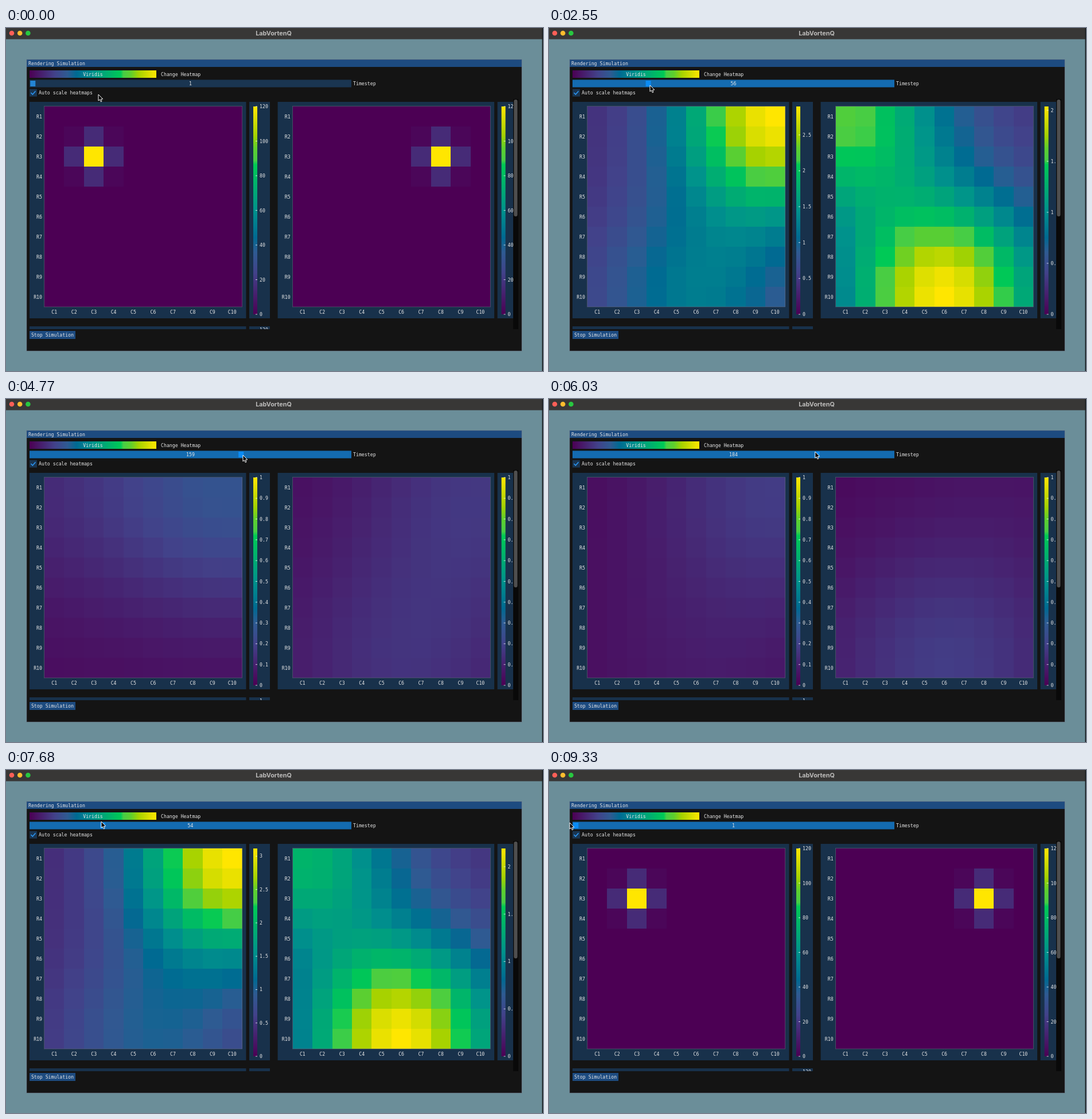
An HTML page with a canvas for the animation above (9780 ms loop, 936 px wide and 599 px high).

```html
<!DOCTYPE html>
<html lang="en">
<head>
<meta charset="utf-8">
<title>Heatmap simulation</title>
<style>
html, body { margin: 0; width: 100%; height: 100%; overflow: hidden; background: #6b8e99; }
canvas { display: block; }
</style>
</head>
<body>
<canvas id="stage" width="936" height="599"></canvas>
<script>
const ctx = document.getElementById('stage').getContext('2d');
const LOOP = 9780, TICK = 30, LAG = 20, DRAG_START = 840, N = 10;
const MONO = '8.22px "DejaVu Sans Mono", monospace';
const FRAME = '#18314b', TEXT = '#e6e6e6', BORDER = 'rgba(110,110,128,.5)';

// Colour map: position, red, green, blue
const STOPS = [
  [0, 76, 0, 84], [.2, 66, 66, 138], [.3, 46, 91, 146], [.37, 0, 106, 146], [.5, 0, 146, 140],
  [.72, 0, 202, 85], [.74, 70, 205, 70], [.8, 95, 207, 45], [.86, 165, 210, 0], [1, 255, 230, 0]
];

// Pointer path: time, x, y
const PATH = [
  [450, 161, 116], [540, 131, 106], [689, 131, 106], [690, 50, 104], [839, 50, 104],
  [840, 48, 97], [1300, 66, 99], [2550, 176, 100], [3270, 259, 100], [4770, 413, 98],
  [5850, 497, 93], [6870, 309, 88], [7680, 166, 90], [9330, 36, 92]
];

// The bloom wanders round three places: column, row
const SITES = [[9, 0], [5, 9], [0, 0]];

// seed: starting column; phase and rate: progress round the sites; levels: step, strength
const maps = [
  { x: 41, seed: 2, phase: -3.414, rate: .49,
    levels: [[60, 3.4], [92, .98], [117, .66], [159, .3], [200, .16]] },
  { x: 473.6, seed: 7, phase: -1.576, rate: .4,
    levels: [[60, 2.96], [92, 1.39], [117, .75], [159, .25], [200, .16]] }
];

const clamp = (v, lo, hi) => Math.min(hi, Math.max(lo, v));
const mix = (a, b, k) => a + (b - a) * k;

// Piecewise linear lookup in rows whose first entry is the key
function lookup(rows, key) {
  let i = 1;
  while (i < rows.length - 1 && rows[i][0] < key) i++;
  const a = rows[i - 1], b = rows[i];
  const k = clamp((key - a[0]) / (b[0] - a[0]), 0, 1);
  return a.slice(1).map((v, j) => mix(v, b[j + 1], k));
}

const heat = v => `rgb(${lookup(STOPS, clamp(v, 0, 1)).map(Math.round)})`;

// Share of the bloom at a site, for a phase that wraps after the last one
function share(phase, site) {
  const n = SITES.length, d = (((phase - site) % n) + n) % n;
  return Math.max(0, 1 - Math.min(d, n - d));
}

// A diffusing spot gives way to a bloom that drifts between the sites and decays
function concentrations({ seed, phase, rate, levels }, step) {
  const late = Math.max(step, 45);
  const logLevels = levels.map(([s, v]) => [s, Math.log(v)]);
  const level = Math.exp(lookup(logLevels, late)[0]);
  const spread = Math.min(20, .22 * late);
  const shares = SITES.map((_, i) => share(phase + rate * Math.sqrt(late), i));
  const w = clamp((step - 5) / 40, 0, 1), handover = w * w * (3 - 2 * w);
  return Array.from({ length: N * N }, (_, i) => {
    const c = i % N, r = Math.floor(i / N);
    const bell = (x, y, variance) => Math.exp(-((c - x) ** 2 + (r - y) ** 2) / (2 * variance));
    const spot = 120 / step * bell(seed, 2, .245 * step);
    const bloom = SITES.reduce((sum, [x, y], k) => sum + shares[k] * bell(x, y, spread), .1);
    return mix(spot, level * bloom, handover);
  });
}

function tickStep(max) {
  const power = 10 ** Math.floor(Math.log10(max * .99));
  const lead = max * .99 / power;
  return (lead <= 1 ? 1 : lead <= 2 ? 2 : lead <= 5 ? 5 : 10) * power / 10;
}

function box(x, y, w, h, fill) {
  ctx.fillStyle = fill;
  ctx.fillRect(x, y, w, h);
}

function border(x, y, w, h) {
  ctx.strokeStyle = BORDER;
  ctx.lineWidth = 1;
  ctx.strokeRect(x, y, w, h);
}

function label(text, x, y, align = 'left', font = MONO, fill = TEXT) {
  ctx.font = font;
  ctx.textAlign = align;
  ctx.fillStyle = fill;
  ctx.fillText(text, x, y);
}

function ramp(x0, y0, x1, y1) {
  const g = ctx.createLinearGradient(x0, y0, x1, y1);
  STOPS.forEach(([p, ...rgb]) => g.addColorStop(p, `rgb(${rgb})`));
  return g;
}

function disc(x, y, r, fill) {
  ctx.fillStyle = fill;
  ctx.beginPath();
  ctx.arc(x, y, r, 0, 7);
  ctx.fill();
}

function drawShell() {
  box(0, 0, 936, 599, '#6b8e99');
  box(0, 0, 936, 19, '#383736');
  box(0, 19, 936, 1, '#4d5b60');
  box(934.5, 0, 1.5, 599, '#14191b');
  ['#ff5f57', '#febc2e', '#28c840'].forEach((c, i) => disc(10 + 14.2 * i, 9, 4.3, c));
  label('LabVortenQ', 466.5, 12.5, 'center', 'bold 10.8px Inter, sans-serif', '#bdbcbb');
  box(36, 55, 863, 509, '#141414');
  box(36, 55, 863, 13, '#1d4b80');
  border(36, 55, 863, 509);
  label('Rendering Simulation', 39, 64.5);
}

function drawControls(step, active) {
  box(41, 74, 221, 13, ramp(41, 0, 262, 0));
  label('Viridis', 151.5, 83.5, 'center');
  label('Change Heatmap', 270, 83.5);
  box(41, 90.4, 561, 13.1, active ? '#146bb0' : '#1a3551');
  box(42.3 + (step - 1) * 2.297, 92, 9, 10, active ? '#0b8cf5' : '#2485d4');
  label(step, 321.5, 100, 'center');
  label('Timestep', 605, 100);
  box(41, 106.7, 13, 13, '#1a3551');
  ctx.strokeStyle = '#2c97f5';
  ctx.lineWidth = 1.6;
  ctx.beginPath();
  ctx.moveTo(43.5, 113);
  ctx.lineTo(46.3, 116);
  ctx.lineTo(51.5, 110.3);
  ctx.stroke();
  label('Auto scale heatmaps', 57, 116.3);
  box(41, 529, 80, 14, '#1d4b80');
  label('Stop Simulation', 81, 539, 'center');
}

function drawMap(map, step) {
  const { x } = map, left = x + 26, top = 137, w = 344.5, h = 350;
  const values = concentrations(map, step);
  const scale = Math.max(1, ...values);
  box(x, 129, 377.5, 378, FRAME);
  const edgeX = c => Math.round(left + w * c / N), edgeY = r => Math.round(top + h * r / N);
  values.forEach((v, i) => {
    const c = i % N, r = Math.floor(i / N);
    box(edgeX(c), edgeY(r), edgeX(c + 1) - edgeX(c), edgeY(r + 1) - edgeY(r), heat(v / scale));
  });
  border(Math.round(left) - .5, top - .5, w + .5, h + .5);
  for (let i = 0; i < N; i++) {
    label('R' + (i + 1), x + 22, 157.5 + 35 * i, 'right');
    label('C' + (i + 1), left + w * (i + .5) / N, 498.8, 'center');
  }

  const bar = x + 390;
  box(x + 383, 129, 36, 378, FRAME);
  box(bar, 137, 7, 363, ramp(0, 500, 0, 137));
  const unit = tickStep(scale);
  for (let n = 0; n * unit <= scale * 1.0001; n++) {
    const y = 500 - 363 * n * unit / scale;
    box(bar + 4, y - .5, 3, 1, 'rgba(255,255,255,.75)');
    label(+(n * unit).toFixed(2), bar + 11, y + 3);
  }
}

function drawPlots(step) {
  ctx.save();
  ctx.beginPath();
  ctx.rect(41, 124, 843, 402);
  ctx.clip();
  maps.forEach(map => drawMap(map, step));
  // Top edge of the next row
  box(41, 521, 377.5, 5, FRAME);
  box(424, 521, 36, 5, FRAME);
  if (step < 3) label('120', 442, 530);
  else if (step > 105) label('1', 442, 530);
  ctx.restore();
  box(884, 124, 9, 402, '#090909');
  ctx.fillStyle = '#4f4f4f';
  ctx.beginPath();
  ctx.roundRect(885.3, 125, 6.2, 204, 3);
  ctx.fill();
}

function drawPointer(x, y) {
  const outline = [[0, 0], [0, 11], [2.5, 8.8], [4.3, 12.8], [6, 12], [4.4, 8.2], [7.8, 8]];
  ctx.beginPath();
  outline.forEach(([dx, dy]) => ctx.lineTo(x + dx, y + dy));
  ctx.closePath();
  ctx.fillStyle = '#000';
  ctx.fill();
  ctx.strokeStyle = '#fff';
  ctx.lineWidth = 1;
  ctx.stroke();
}

function draw(now) {
  const t = Math.floor(now % LOOP / TICK) * TICK;
  const active = t >= DRAG_START;
  // The slider trails the pointer slightly
  const grabX = active ? lookup(PATH, Math.max(DRAG_START, t - LAG))[0] : 47;
  const step = clamp(Math.round(1 + (grabX - 47) / 2.297), 1, 240);
  drawShell();
  drawControls(step, active);
  drawPlots(step);
  drawPointer(...lookup(PATH, t));
}

const start = performance.now();
function loop() {
  draw(performance.now() - start);
  requestAnimationFrame(loop);
}
loop();
</script>
</body>
</html>
```
